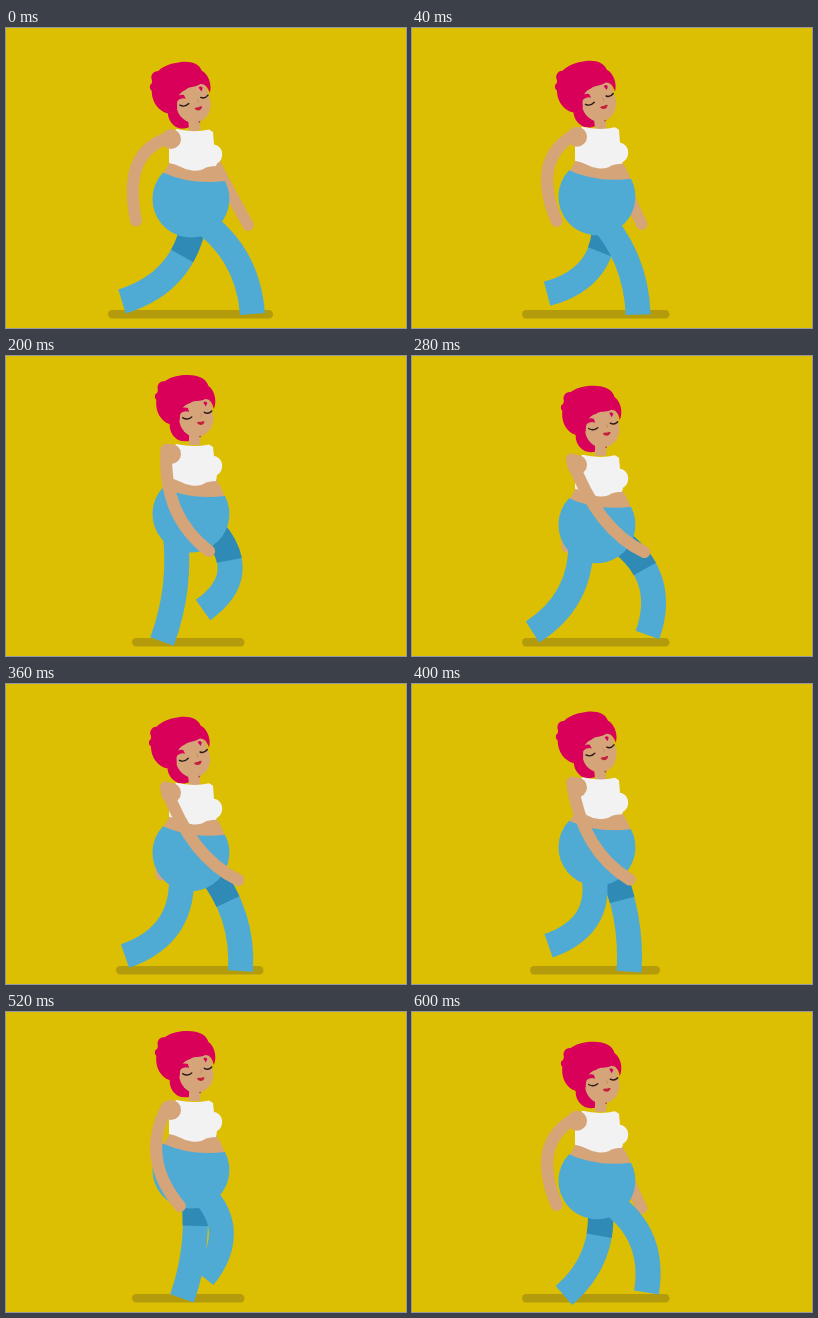
An HTML page with a canvas for the animation above (0.64 s loop, 400 by 300 pixels).

```html
<!DOCTYPE html>
<html lang="en">
<head>
<meta charset="utf-8">
<title>Walk cycle</title>
<style>
  html, body { margin: 0; width: 100%; height: 100%; overflow: hidden; background: #dcbf03; }
  canvas { display: block; width: 400px; height: 300px; }
</style>
</head>
<body>
<canvas id="stage"></canvas>
<script>
const STEP = 40, STEPS = 16, THIGH = .35;
const BG = '#dcbf03', SHADOW = '#b39b0b', BLUE = '#50abd4', DENIM = '#2f8bb5',
      SKIN = '#d5a478', PINK = '#d80058', WHITE = '#f2f2f2', LIPS = '#c2203c', INK = '#2a1a1a';

// Foot paths: step, x, y. Hips and knees follow from the phase.
const NEAR_FOOT = [[0, 246.5, 286], [3, 177, 286], [5, 156, 285.5], [7, 120.5, 276], [9, 119, 272], [11, 159, 255], [15, 234.5, 280.5]];
const FAR_FOOT = [[0, 116, 273.5], [3, 188, 253], [5, 197, 254], [7, 235.5, 279], [9, 234.5, 287], [11, 197.5, 287], [15, 152, 283.5]];

const canvas = document.getElementById('stage');
const dpr = window.devicePixelRatio || 1;
canvas.width = 400 * dpr;
canvas.height = 300 * dpr;
const ctx = canvas.getContext('2d');
ctx.scale(dpr, dpr);

const wave = (s, period) => Math.cos(2 * Math.PI * s / period);
const mix = (a, b, t) => a.map((v, i) => v + (b[i] - v) * t);

// Smooth interpolation around the loop.
function loopAt(keys, s) {
  const n = keys.length;
  const at = i => keys[(i + n) % n];
  const time = i => at(i)[0] + Math.floor(i / n) * STEPS;
  let i = n - 1;
  while (keys[i][0] > s) i--;
  const h = time(i + 1) - time(i), f = (s - time(i)) / h, g = 1 - f;
  return [1, 2].map(j => {
    const val = k => at(k)[j];
    const slope = k => (val(k + 1) - val(k - 1)) / (time(k + 1) - time(k - 1));
    return val(i) * g * g * (1 + 2 * f) + val(i + 1) * f * f * (3 - 2 * f)
      + h * f * g * (slope(i) * g - slope(i + 1) * f);
  });
}

function oval(x, y, rx, ry, color) {
  ctx.fillStyle = color;
  ctx.beginPath();
  ctx.ellipse(x, y, rx, ry, 0, 0, 7);
  ctx.fill();
}

function shape(d, color) {
  ctx.fillStyle = color;
  ctx.fill(new Path2D(d));
}

function line(d, color, width, cap = 'round') {
  ctx.strokeStyle = color;
  ctx.lineWidth = width;
  ctx.lineCap = cap;
  ctx.stroke(new Path2D(d));
}

function hose(a, bend, b, color, width, cap) {
  line(`M${a} Q${bend} ${b}`, color, width, cap);
}

function leg(path, s, phase, hipX, dy, dark) {
  const hip = [hipX + 11 * wave(phase + 2, STEPS), 187 + dy];
  const foot = loopAt(path, s);
  const dx = foot[0] - hip[0], drop = foot[1] - hip[1], len = Math.hypot(dx, drop);
  const bend = 30 - 18 * wave(phase - 3.5, STEPS) - 3 * wave(phase - 3.5, STEPS / 2);
  const mid = mix(hip, foot, .5);
  const knee = [mid[0] + bend * drop / len, mid[1] - bend * dx / len];
  hose(hip, knee, foot, BLUE, 25, 'butt');
  if (dark) {
    const top = mix(hip, knee, THIGH);
    hose(hip, top, mix(top, mix(knee, foot, THIGH), THIGH), DENIM, 25.4, 'butt');
  }
}

function nearArm(f, dy) {
  oval(165, 111 + dy, 10, 10, SKIN);
  hose([162 - 2.5 * f, 110 - 5 * f + dy], [116 + 86 * f ** 1.6, 125 + 56 * f],
    [130 + 117 * f, 192.5 + 4 * f], SKIN, 12);
}

function farArm(f, dy) {
  hose([197, 112 + dy], [219 - 78 * f, 156], [242 - 99 * f, 197 - 7 * f], SKIN, 11.5);
}

function torso(dy, bounce) {
  ctx.save();
  ctx.translate(0, dy);
  shape('M164 128 L163 136 L157 146 Q184 166 219 154 Q216 145 210 136 Z', SKIN);
  shape('M157 144.5 Q184 157 219 153 A38.5 38.5 0 1 1 157 144.5 Z', BLUE);
  const b = y => y + bounce;
  shape(`M170 101 Q188 105 203 101.5 L207 104 L208 ${b(116)}
    C214 ${b(117)} 217 ${b(122)} 216 ${b(128)} Q215 ${b(133)} 211 ${b(135)}
    L210 138 Q204 138 200 139.5 Q194 143.5 186 142.5 Q180 142 175 139 Q169 136 163 135 L163 112 Z`, WHITE);
  ctx.restore();
}

function head(dy, turn) {
  ctx.save();
  ctx.translate(188, 88 + dy);
  ctx.rotate(turn * Math.PI / 180);
  ctx.translate(-188, -88);
  oval(178.5, 71, 15, 16.5, PINK);
  shape('M183 76 L183 91 L194 91 L195 78 Z', SKIN);
  oval(190, 64, 17.2, 19, SKIN);
  oval(191, 54, 14.5, 14, SKIN);
  oval(157, 34, 6, 6.5, PINK);
  oval(152.5, 43, 4, 3.8, PINK);
  shape(`M150 46 C150 27 166 21 181 21 C193 21 200 25 202 32
    C208 36 211 47 207.5 55 C206 48 203 45 199 45 C193 48 188 46 184 49
    C178 51 174 54 173.5 66 C172 72 166 72 160 69 C152 64 149 55 150 46 Z`, PINK);
  shape('M173 57 Q176 52.5 181.5 54 L183 58 Q178 56 173.5 60 Z', PINK);
  shape('M197 48.5 Q199 46 201 49 L199.5 52.5 Z', PINK);
  line('M176.5 63.8 Q181 66.8 185.5 63', INK, 1.4);
  line('M198 58.3 Q202 60.5 205.5 56.8', INK, 1.4);
  line('M194 59.5 Q196.5 61 195 63', '#bd8961', .8);
  shape('M190.5 68.6 Q193 67.3 194.5 68 Q196.5 66.7 198.5 67.4 Q197.5 70.8 194.5 71 Q192 70.8 190.5 68.6 Z', LIPS);
  oval(194, 82.5, 1, .8, '#b4493f');
  ctx.restore();
}

function draw(s) {
  const bob = s % 8;
  const swing = Math.min(s, STEPS - s) / 8;
  const spread = Math.abs(4 - bob) / 4;
  const dy = 7.65 * (wave(bob, 8) - 1);
  const nod = Math.sqrt(Math.max(0, wave(bob - 1, 8)));

  ctx.fillStyle = BG;
  ctx.fillRect(0, 0, 400, 300);
  ctx.fillStyle = SHADOW;
  ctx.beginPath();
  ctx.roundRect(134 - 32 * spread, 282, 95 + 70 * spread, 8.5, 4.25);
  ctx.fill();

  farArm(swing, dy);
  leg(FAR_FOOT, s, s + 8, 197, dy, true);
  leg(NEAR_FOOT, s, s, 179, dy, false);
  head(dy + 12 + 1.4 * wave(bob - 2, 8), .5 - 8 * nod);
  torso(dy, 2 * wave(bob - 1, 8) - 1);
  nearArm(swing, dy);
}

function tick() {
  draw(Math.floor(performance.now() / STEP) % STEPS);
  requestAnimationFrame(tick);
}
tick();
</script>
</body>
</html>
```
